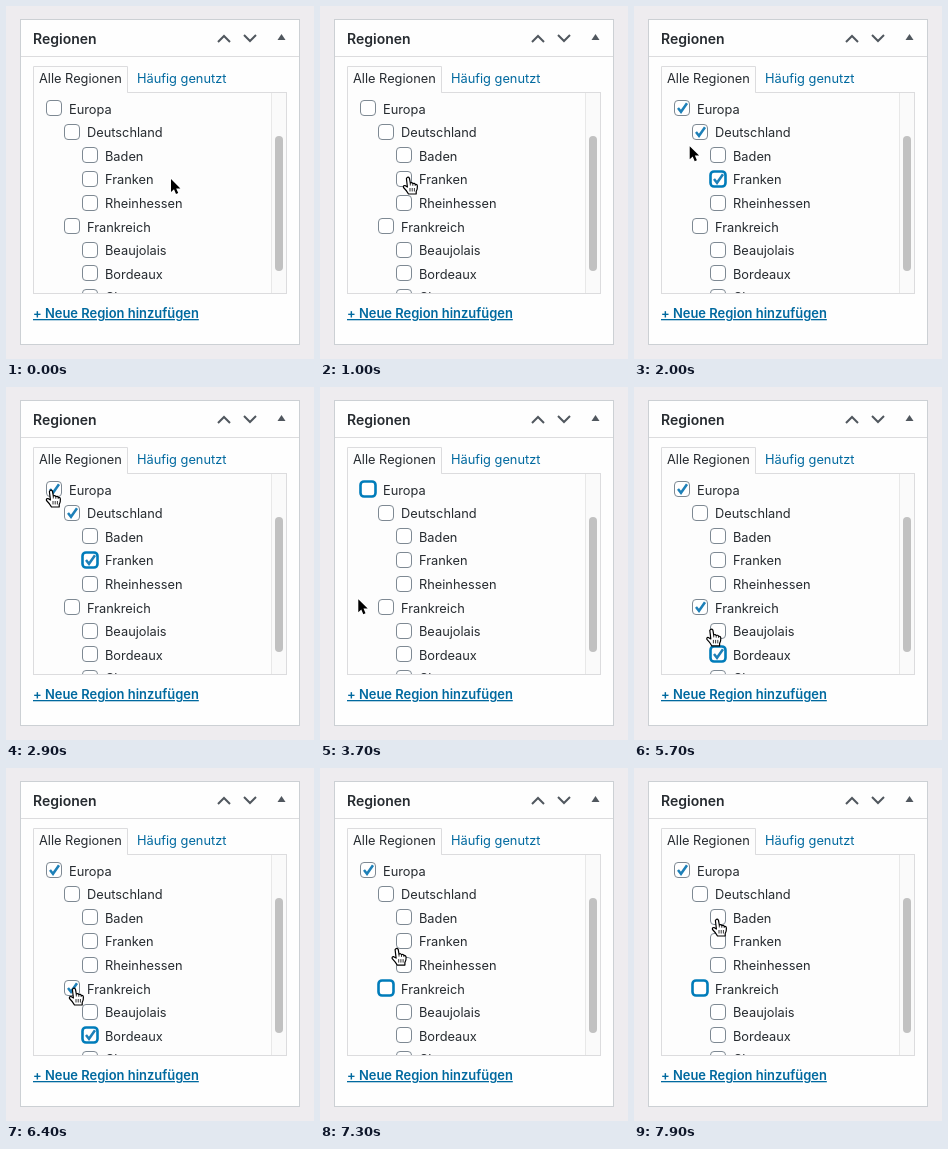
Write an HTML page that moves like this. It is 308x353 px and loops after 8000 ms.

```html
<!DOCTYPE html>
<html lang="de">
<head>
<meta charset="utf-8">
<title>Regionen</title>
<style>
  html, body { margin: 0; width: 100%; height: 100%; overflow: hidden; background: #eeecef; }
  svg { display: block; width: 308px; height: 353px; }
  text { font: 12.8px Inter, "Open Sans", sans-serif; fill: #262b30; }
  .bold { font-weight: 600; }
  .link { fill: #00699f; }
  .line { fill: none; stroke: #dcdcde; }
  .box { fill: #fff; stroke: #7e8993; }
  .box.focus { stroke: #007cba; stroke-width: 2.6; }
  .check { fill: none; stroke: #1e80b8; stroke-width: 2.5; }
  .icon { fill: none; stroke: #50575e; stroke-width: 2; }
</style>
</head>
<body>
<svg viewBox="0 0 308 353">
  <clipPath id="clip"><rect x="28" y="87" width="237" height="200"/></clipPath>
  <rect x="14.5" y="13.5" width="279" height="325" fill="#fefefe" stroke="#ccd0d4"/>
  <path class="line" d="M15 50.5H293"/>
  <text class="bold" x="27" y="38" style="font-size:14px">Regionen</text>
  <path class="icon" d="M212 36l6-6 6 6M238 29l6 6 6-6"/>
  <path d="M271.5 34h8l-4-6z" fill="#50575e"/>

  <rect x="27.5" y="86.5" width="253" height="201" fill="#fdfdfd" stroke="#dcdcde"/>
  <path class="line" d="M27.5 87V60.5H121.5V86.5" style="fill:#fdfdfd"/>
  <path d="M28 86.5H121" stroke="#fdfdfd"/>
  <text x="33" y="77">Alle Regionen</text>
  <text class="link" x="131" y="77">Häufig genutzt</text>

  <rect x="265" y="87" width="15" height="200" fill="#fafafa"/>
  <path d="M265.5 87V287" stroke="#e8e8e8"/>
  <rect x="269" y="130" width="8" height="135" rx="4" fill="#c1c1c1"/>

  <g id="list" clip-path="url(#clip)"></g>
  <text class="bold link" x="27" y="312" text-decoration="underline" style="font-size:12.95px">+ Neue Region hinzufügen</text>

  <path id="arrow" d="M0 0V13L3 10.2 5 15 7.2 14 5.2 9.4H9.4Z"
    fill="#000" stroke="#fff" stroke-width="1.8" paint-order="stroke"/>
  <g id="hand" stroke="#000" stroke-width="1.2" stroke-linejoin="round">
    <path fill="#fff" d="M-1.6 1.5Q0-1 1.5 1.3L2.3 6Q4 5 4.8 6.6 6.6 5.8 7.2 7.4 9 7 9.4 9 9.6 12 8.2 14.5V17H.5Q-1 14-4.5 10.5-5 8.300-3 8.600L-.6 10Z"/>
    <path fill="none" stroke-width=".8" d="M2.3 6v2.5M4.800 6.600v2.200M7.200 7.400v1.600M2 11v3.500m2.200 0v-3.500m2.200 0v3.500"/>
  </g>
</svg>
<script>
const LOOP = 8000, STEP = 100, RELEASE = 100;
const $ = id => document.getElementById(id);

// indentation gives the depth in the tree
const rows = `Europa
 Deutschland
  Baden
  Franken
  Rheinhessen
 Frankreich
  Beaujolais
  Bordeaux
  Champagne`.split('\n').map((line, i) => {
  const name = line.trim(), depth = line.length - name.length;
  return { name, depth, x: 48 + 18 * depth, y: 102.2 + 23.6 * i };
});

$('list').innerHTML = rows.map(({ name, x, y }) => {
  const cy = Math.round(y);
  return `<rect class="box" x="${x - 7.5}" y="${cy - 7.5}" width="15" height="15" rx="3.5"/>
    <path class="check" d="M${x - 4} ${cy}l3 3.8 6-8.6"/>
    <text x="${x + 15}" y="${Math.round(y + 5.4)}">${name}</text>`;
}).join('');
const boxes = document.querySelectorAll('.box');
const checks = document.querySelectorAll('.check');

// the pointer travels to (x, y), bowing sideways, then may press a row
const visits = [
  { leave: 0, arrive: 1000, x: 88, y: 171, press: 1200, row: 3 },
  { leave: 1800, arrive: 2900, x: 45, y: 103, bow: -13, press: 3100, row: 0 },
  { leave: 3300, arrive: 4600, x: 88, y: 266.5, bow: -41, press: 4900, row: 7 },
  { leave: 5500, arrive: 6400, x: 68, y: 220, press: 6600, row: 5 },
  { leave: 7100, arrive: 7900, x: 83, y: 151 }
];

function pointer(t) {
  let x = 165, y = 173;
  for (const v of visits) {
    if (t < v.leave) break;
    const u = Math.min(1, (t - v.leave) / (v.arrive - v.leave));
    const ease = 1 - (1 - u) ** 3;
    x += (v.x - x) * ease + (v.bow || 0) * Math.sin(Math.PI * ease);
    y += (v.y - y) * ease;
  }
  return [x, y];
}

// checking a row also checks its ancestors, clearing it clears its descendants
function toggle(on, row) {
  const value = on[row] = !on[row], dir = value ? -1 : 1;
  let depth = rows[row].depth;
  for (let i = row + dir; rows[i]; i += dir) {
    const d = rows[i].depth;
    if (!value && d <= depth) break;
    if (!value) on[i] = false;
    else if (d < depth) { on[i] = true; depth = d; }
  }
}

function draw(now) {
  const t = Math.floor(now % LOOP / STEP) * STEP;
  const on = rows.map(() => false);
  let focus = -1;
  for (const { press, row } of visits) {
    if (t >= press) focus = row;
    if (t >= press + RELEASE) toggle(on, row);
  }
  boxes.forEach((b, i) => b.classList.toggle('focus', i === focus));
  checks.forEach((c, i) => c.style.display = on[i] ? '' : 'none');

  const [x, y] = pointer(t);
  const over = rows.some(r => x > r.x - 9 && x < r.x + 15 + r.name.length * 7 && Math.abs(y - r.y) < 9);
  for (const id of ['arrow', 'hand']) {
    $(id).setAttribute('transform', `translate(${x.toFixed(1)} ${y.toFixed(1)})`);
    $(id).style.display = (id === 'hand') === over ? '' : 'none';
  }
}

const start = performance.now();
function tick() {
  draw(performance.now() - start);
  requestAnimationFrame(tick);
}
tick();
</script>
</body>
</html>
```
